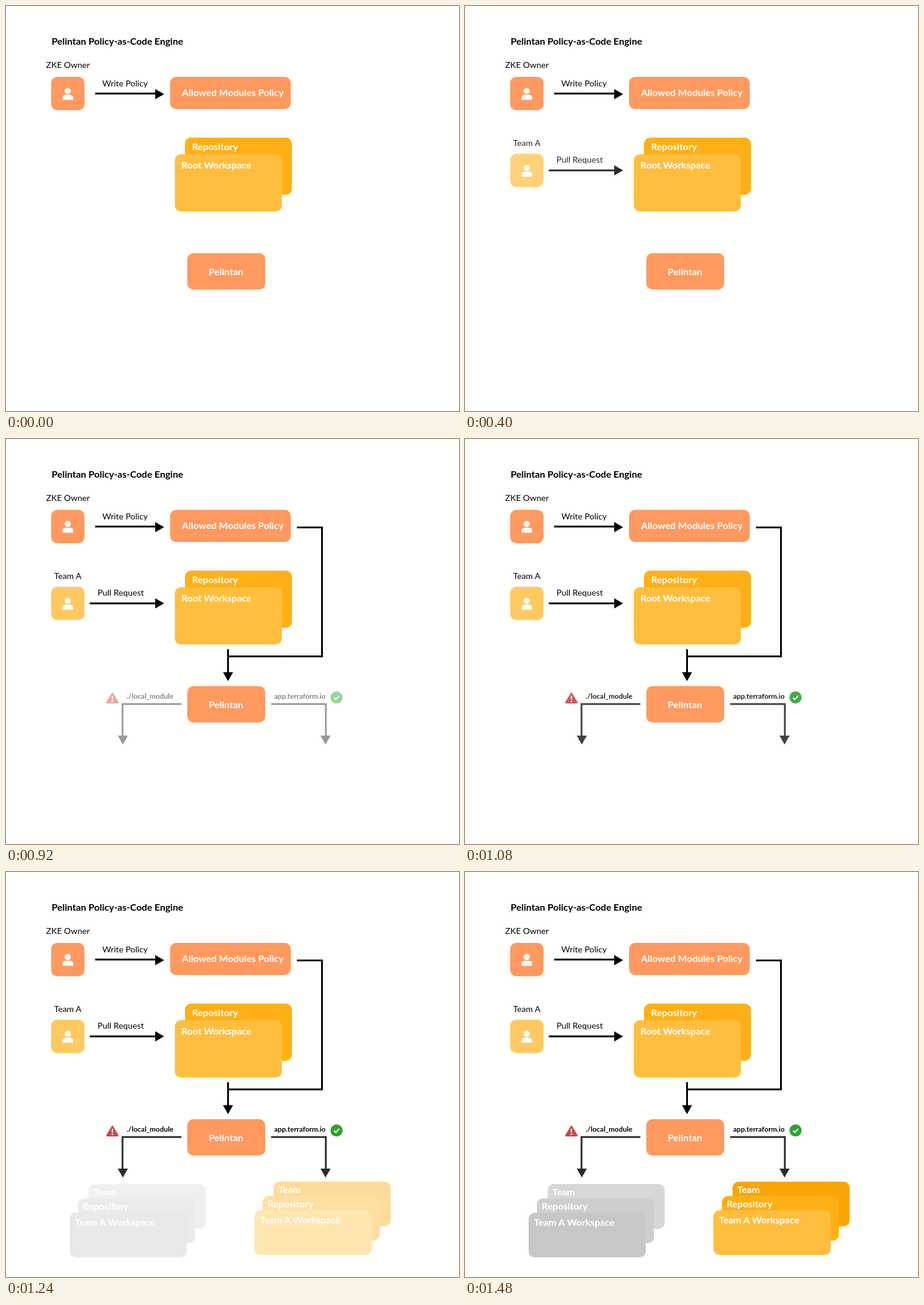
Write an HTML page that moves like this. It is 762 px wide and 680 px high and loops after 2960 ms.

```html
<!DOCTYPE html>
<html lang="en">
<head>
<meta charset="utf-8">
<title>Policy engine</title>
<style>
  html, body { margin: 0; width: 100%; height: 100%; overflow: hidden; background: #fffffe; }
  svg { display: block; }
  text { font: 700 16px Lato, Carlito, sans-serif; fill: #000; }
  .label { font-weight: 400; font-size: 14.3px; }
  .path { font-size: 12px; }
  .white text, text.white { fill: #fff; }
  .end { text-anchor: end; }
  .line { fill: none; stroke: #000; stroke-width: 3; }
  .dark .line { stroke: #2b2b2d; }
  .dark .head { fill: #2b2b2d; }
  .stage { opacity: 0; }
</style>
</head>
<body>
<svg width="762" height="680" viewBox="0 0 762 680">
  <defs>
    <g id="user" fill="#fff">
      <circle cx="27.8" cy="23.6" r="5.2"/>
      <path d="M19 37.2V35.5Q19 30 24.5 30H31.5Q37 30 37 35.5V37.2Q37 38.5 35.7 38.5H20.3Q19 38.5 19 37.2Z"/>
    </g>
    <path id="head" d="M-8.5 0H8.5L0 15Z"/>
    <g id="stack-text" class="white">
      <text x="40" y="19">Team</text>
      <text x="22" y="43">Repository</text>
      <text x="9" y="70">Team A Workspace</text>
    </g>
  </defs>

  <text class="end" x="298" y="65">Pelintan Policy-as-Code Engine</text>
  <text class="label end" x="141" y="104">ZKE Owner</text>
  <rect x="76" y="119" width="56" height="56" rx="10" fill="#ff995f"/>
  <use href="#user" x="76" y="119"/>
  <text class="label" x="162" y="135">Write Policy</text>
  <path class="line" d="M150 147H252"/>
  <use href="#head" transform="translate(251 148) rotate(-90)"/>
  <rect x="276" y="119" width="203" height="54" rx="10" fill="#ff995f"/>
  <text class="white" x="296" y="151">Allowed Modules Policy</text>

  <rect x="301" y="221" width="180" height="96" rx="10" fill="#ffb017"/>
  <text class="white" x="313" y="242">Repository</text>
  <rect x="284" y="249" width="180" height="96" rx="10" fill="#ffbe3e"/>
  <text class="white" x="295" y="273">Root Workspace</text>
  <rect x="305" y="415" width="131" height="61" rx="10" fill="#ff995f"/>
  <text class="white" x="370" y="452" text-anchor="middle">Pelintan</text>

  <g class="stage" data-from="0" data-to="480">
    <text class="label" x="81" y="235">Team A</text>
    <rect x="76" y="248" width="56" height="56" rx="10" fill="#ffc961"/>
    <use href="#user" x="76" y="248"/>
    <text class="label" x="154" y="263">Pull Request</text>
    <path class="line" d="M141 276H252"/>
    <use href="#head" transform="translate(251 276) rotate(-90)"/>
  </g>

  <g class="stage" data-from="400" data-to="820">
    <path class="line" d="M489.5 148.5H531.5V365H373.5M373.5 353V392"/>
    <use href="#head" x="373.5" y="391.5"/>
  </g>

  <g class="stage dark" data-from="740" data-to="1120">
    <path class="line" d="M295 445H196V499M446 445H538V499"/>
    <use class="head" href="#head" x="196.5" y="498"/>
    <use class="head" href="#head" x="537.5" y="498"/>
    <text class="path" x="203" y="436">./local_module</text>
    <text class="path" x="451" y="436">app.terraform.io</text>
    <path d="M179 427.5L188 442.5H170Z" fill="#cb4a4c" stroke="#cb4a4c" stroke-width="3" stroke-linejoin="round"/>
    <path d="M179 432V436.5" stroke="#fff" stroke-width="2.2" stroke-linecap="round"/>
    <circle cx="179" cy="440.3" r="1.4" fill="#fff"/>
    <circle cx="556" cy="434" r="10.2" fill="#2ea22f"/>
    <path d="M551.7 434.3L554.7 437.2L560.4 431.3" fill="none" stroke="#fff" stroke-width="2.1"/>
  </g>

  <g class="stage" data-from="1080" data-to="1480">
    <g transform="translate(107 524)">
      <rect x="32" width="197" height="75" rx="10" fill="#d7d7d7"/>
      <rect x="14" y="24" width="197" height="75" rx="10" fill="#cecece"/>
      <rect y="48" width="197" height="75" rx="10" fill="#c7c7c7"/>
      <use href="#stack-text"/>
    </g>
    <g transform="translate(418 520)">
      <rect x="32" width="197" height="75" rx="10" fill="#faa506"/>
      <rect x="14" y="24" width="197" height="75" rx="10" fill="#ffb017"/>
      <rect y="48" width="197" height="75" rx="10" fill="#ffbe3e"/>
      <use href="#stack-text"/>
    </g>
  </g>
</svg>
<script>
  const LOOP = 2960, STEP = 40;
  const stages = document.querySelectorAll('.stage');
  const start = performance.now();

  function draw(now) {
    const elapsed = Math.max(0, now - start) % LOOP;
    const t = Math.floor(elapsed / STEP) * STEP;
    for (const el of stages) {
      const { from, to } = el.dataset;
      el.style.opacity = Math.min(1, Math.max(0, (t - from) / (to - from)));
    }
    requestAnimationFrame(draw);
  }
  draw(start);
</script>
</body>
</html>
```
